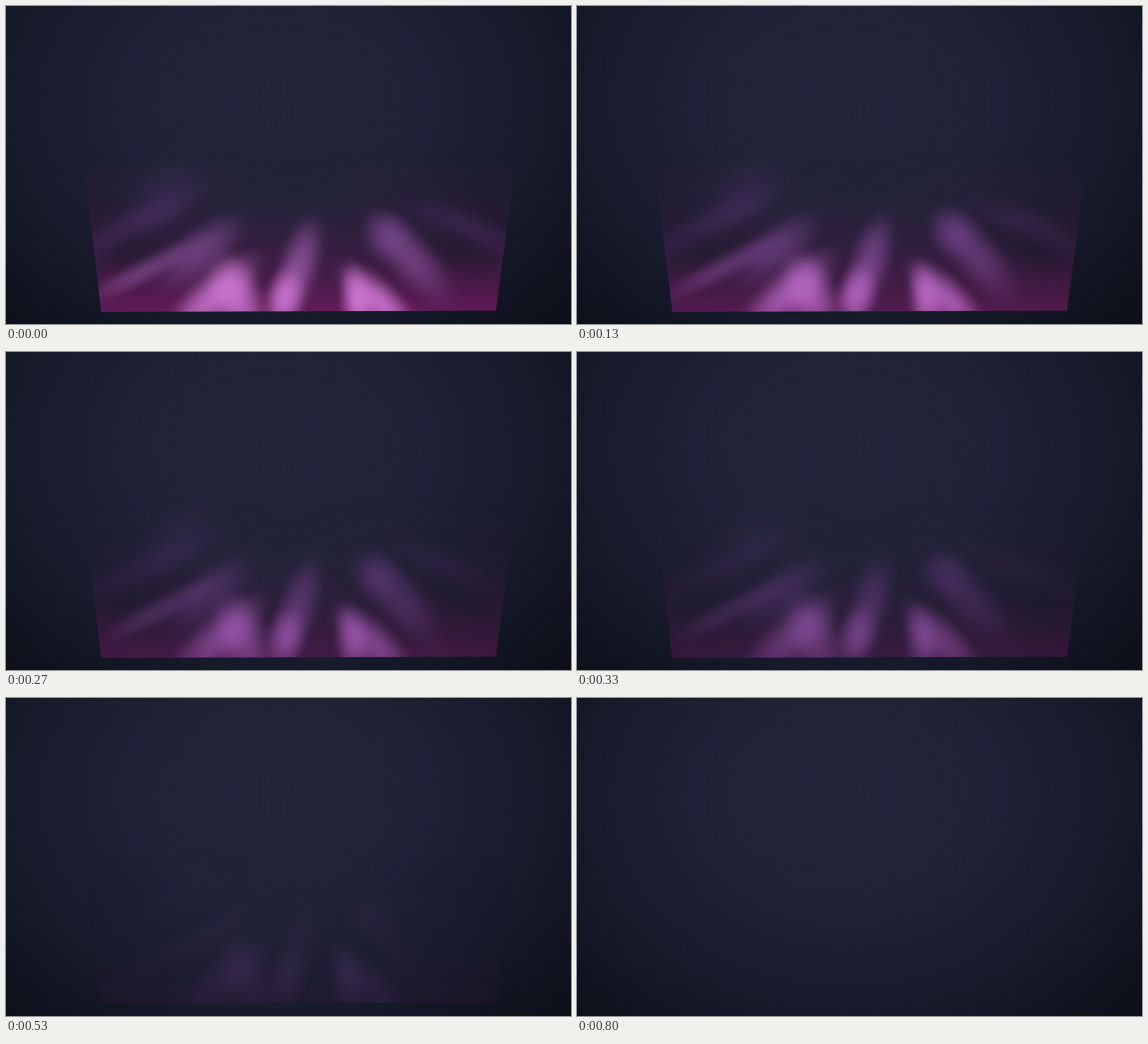
An HTML page with a canvas that plays this animation: 700x394 px, repeating every 1.54 s.

```html
<!DOCTYPE html>
<html lang="en">
<head>
<meta charset="utf-8">
<title>Fading glow</title>
<style>
  html, body { margin: 0; width: 100%; height: 100%; overflow: hidden; background: #151823; }
  canvas { display: block; width: 100vw; height: 100vh; }
</style>
</head>
<body>
<canvas id="stage" width="700" height="394"></canvas>
<script>
const W = 700, H = 394, LOOP = 1540, TICK = 200 / 3, REST = 800, FADE = 650;
const MID = 360, TOP = 185, FLOOR = 378;
const ctx = document.getElementById('stage').getContext('2d');
const layer = document.createElement('canvas');
layer.width = W;
layer.height = H;
const glow = layer.getContext('2d');

const PINK = [225, 132, 228], DUSK = [92, 54, 130], WINE = [116, 28, 100],
      LATE = [150, 72, 215], BLACK = [0, 0, 0];

// Each plume runs from a tail to a tip: x, y, x, y, width
const PLUMES = [
  [160, 262, 235, 205, 45],
  [95, 305, 230, 235, 28],
  [625, 300, 515, 250, 28],
  [120, 355, 225, 300, 20],
  [205, 335, 278, 275, 36],
  [485, 305, 460, 265, 40],
  [535, 350, 465, 272, 36],
  [347, 375, 376, 278, 32],
  [338, 390, 352, 335, 30],
  [215, 400, 295, 325, 36],
  [300, 400, 272, 325, 40],
  [495, 400, 430, 335, 32],
  [440, 400, 430, 335, 26]
];

const rgba = (c, a) => `rgba(${c.map(Math.round)},${a})`;
const mix = (a, b, k) => a.map((v, i) => v + (b[i] - v) * k);
const clamp = v => Math.max(0, Math.min(1, v));

function soft(x, y, rx, ry, angle, alpha, colour) {
  const fill = glow.createRadialGradient(0, 0, 0, 0, 0, 1);
  for (let r = 0; r <= 1; r += .125) {
    fill.addColorStop(r, rgba(colour, alpha * (1 - r * r) ** 2));
  }
  glow.save();
  glow.translate(x, y);
  glow.rotate(angle);
  glow.scale(rx, ry);
  glow.fillStyle = fill;
  glow.fillRect(-1, -1, 2, 2);
  glow.restore();
}

function backdrop() {
  const fill = ctx.createRadialGradient(0, 0, 0, 0, 0, 1.2);
  fill.addColorStop(0, '#232539');
  fill.addColorStop(.33, '#202337');
  fill.addColorStop(.67, '#161a29');
  fill.addColorStop(1, '#0c0e17');
  ctx.save();
  ctx.translate(335, 120);
  ctx.scale(420, 340);
  ctx.fillStyle = fill;
  ctx.fillRect(-1, -1, 2, 2);
  ctx.restore();
}

// Higher parts fade sooner
const power = k => 1.6 - .55 * k;

function haze(fade) {
  const fill = glow.createLinearGradient(0, TOP, 0, FLOOR);
  for (let s = 0; s <= 1; s += .125) {
    const alpha = .06 * Math.min(1, s * 8) + .74 * s ** 2.3;
    fill.addColorStop(s, rgba(WINE, alpha * fade ** power(s)));
  }
  glow.fillStyle = fill;
  glow.fillRect(0, TOP, W, H - TOP);
}

// Height sets brightness, colour and drift; plumes dim towards the sides
function plume([x0, y0, x1, y1, width], u, fade) {
  const x = (x0 + x1) / 2, y = (y0 + y1) / 2;
  const k = clamp((y - 230) / 140);
  const side = 1 - clamp(Math.abs(x - MID) / 240) ** 4;
  const alpha = (.25 + .55 * k) * side * fade ** power(k);
  const colour = mix(mix(DUSK, PINK, k ** 1.3), LATE, u * .7);
  const pull = (.35 - .15 * k) * u;
  soft(x + (MID - x) * pull, y - 20 * u, width, Math.hypot(x1 - x0, y1 - y0) * .85,
    Math.atan2(x0 - x1, y1 - y0), alpha, colour);
}

function hollows() {
  glow.globalCompositeOperation = 'destination-out';
  soft(350, 205, 165, 80, 0, .95, BLACK);
  for (const s of [-1, 1]) soft(MID + 202 * s, 301, 64, 32, .4 * s, .45, BLACK);
}

function paintGlow(t) {
  const u = clamp(t / FADE);
  const fade = (1 - u + (1 + Math.cos(Math.PI * u)) / 2) / 2;
  glow.clearRect(0, 0, W, H);
  glow.save();
  glow.beginPath();
  glow.moveTo(95, TOP);
  glow.lineTo(118, 379);
  glow.lineTo(607, 377.5);
  glow.lineTo(633, TOP);
  glow.clip();
  haze(fade);
  PLUMES.forEach(p => plume(p, u, fade));
  hollows();
  glow.restore();
}

function frame(now) {
  const time = now % LOOP;
  backdrop();
  if (time < REST) {
    // Fifteen steps a second, holding the last faint one
    const step = Math.min(9, Math.floor((time + 4) / TICK));
    paintGlow(step * TICK);
    ctx.drawImage(layer, 0, 0);
  }
  requestAnimationFrame(frame);
}

frame(0);
</script>
</body>
</html>
```
